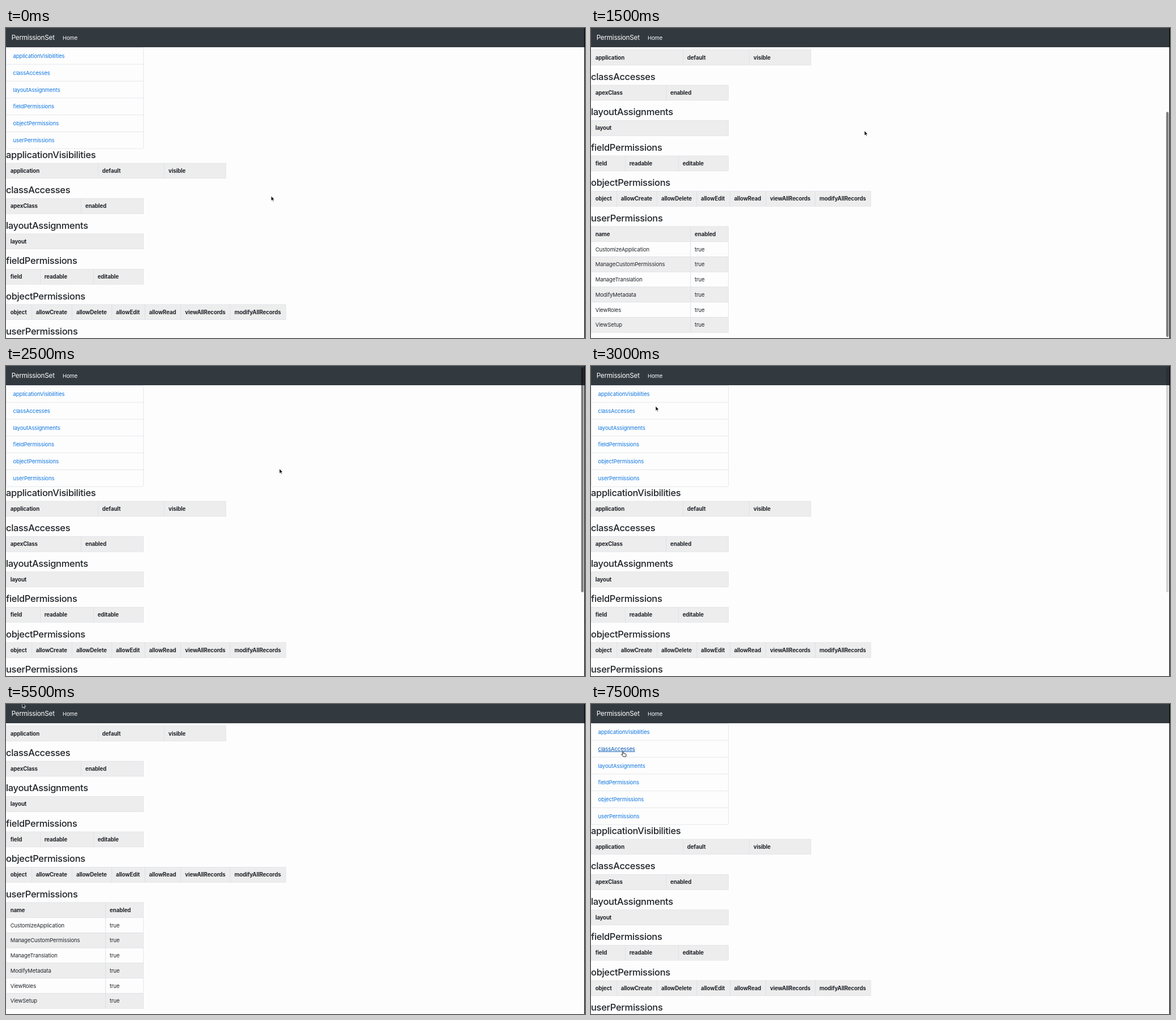
An HTML page for the animation above (8000 ms loop, 1022x548 px).

```html
<!DOCTYPE html>
<html lang="en">
<head>
<meta charset="utf-8">
<title>PermissionSet</title>
<style>
html, body { margin: 0; width: 100%; height: 100%; overflow: hidden; background: #fdfdfd; }
svg { display: block; width: 1022px; height: 548px; }
text { font: 9.5px Inter, Roboto, sans-serif; letter-spacing: -.012em; fill: #212529; }
.link { fill: #0f76e0; }
.link.hover { fill: #0056b3; text-decoration: underline; }
.title { font-size: 16.5px; font-weight: 500; letter-spacing: -.02em; }
.head { font-size: 9.7px; font-weight: 700; }
.nav { fill: #fff; }
.brand { font-size: 11.7px; letter-spacing: -.02em; }
.border { fill: none; stroke: #dddfe5; stroke-width: .7; }
</style>
</head>
<body>
<svg viewBox="0 0 1022 548">
  <g id="page"></g>
  <rect width="1022" height="34" fill="#32393f"/>
  <text class="nav brand" x="9.7" y="21.4">PermissionSet</text>
  <text class="nav" x="100" y="20.8">Home</text>
  <rect id="thumb" x="1015.2" width="4.4" height="398" rx="2.2"/>
  <rect x="1020.8" width="1.2" height="548"/>
  <path id="arrow" d="M0 0V8.6L2 6.8 3.3 9.8 4.7 9.2 3.4 6.3H6Z" stroke="#fff" stroke-width=".8"/>
  <path id="hand" d="M2.2 6V1.2a.9.9 0 0 1 1.8 0V4l3.6.6q1.2.3 1.1 1.6L8.2 9.6H3.6L.6 6.2q-.5-1 .4-1.2Z"
        fill="#fff" stroke="#111" stroke-width=".9"/>
</svg>
<script>
const $ = id => document.getElementById(id);
const page = $('page');

function add(tag, attrs, content = '') {
  const node = document.createElementNS('http://www.w3.org/2000/svg', tag);
  for (const name in attrs) node.setAttribute(name, attrs[name]);
  node.textContent = content;
  page.append(node);
  return node;
}

const ROW = 26.76, SECTION = 62.45, LINK_ROW = 29.8;

// Each section: title, column edges, header row, then data rows.
const sections = [
  ['applicationVisibilities', [0, 162, 279, 388.5], ['application', 'default', 'visible']],
  ['classAccesses', [0, 132.3, 243], ['apexClass', 'enabled']],
  ['layoutAssignments', [0, 243], ['layout']],
  ['fieldPermissions', [0, 60, 154, 243], ['field', 'readable', 'editable']],
  ['objectPermissions', [0, 45, 116.2, 186.4, 244.8, 308.3, 395.5, 494.3],
    ['object', 'allowCreate', 'allowDelete', 'allowEdit', 'allowRead', 'viewAllRecords', 'modifyAllRecords']],
  ['userPermissions', [0, 175.4, 243], ['name', 'enabled'],
    ...['CustomizeApplication', 'ManageCustomPermissions', 'ManageTranslation',
      'ModifyMetadata', 'ViewRoles', 'ViewSetup'].map(name => [name, 'true'])]
];

add('rect', { class: 'border', x: .4, y: 34.4, width: 242.2, height: 178.8, rx: 2 });
const links = sections.map(([title], i) => {
  const top = 34.4 + i * LINK_ROW;
  if (i) add('path', { class: 'border', d: `M0 ${top}H243` });
  return add('text', { class: 'link', x: 12.6, y: top + 18.5 }, title);
});

sections.forEach(([title, edges, ...rows], i) => {
  const top = 239 + i * SECTION;
  add('text', { class: 'title', x: 0, y: top - 9 }, title);
  rows.forEach((cells, r) => cells.forEach((label, c) => {
    const x = edges[c], y = top + r * ROW;
    add('rect', {
      class: 'border', x: x + .4, y, width: edges[c + 1] - x - (c === cells.length - 1 ? .8 : 0), height: ROW,
      style: `fill: ${r % 2 ? '#fdfdfd' : '#ededee'}`
    });
    add('text', { class: r ? 'cell' : 'head', x: x + 7.7, y: y + 17 }, label);
  }));
});

const STEP = 500, BOTTOM = 200.4;
// One state per step: scroll, scrollbar opacity, pointer x, pointer y, pointer shape.
const states = [
  [0, 0, 468, 297, 'arrow'],
  [0, 0, 478, 240, 'arrow'],
  [.6, 0, 482.6, 181.5, 'arrow'],
  [BOTTOM, .5, 482.6, 181.5, 'arrow'],
  [125.3, .5, 482.6, 181.5, 'arrow'],
  [0, .5, 482.6, 181.5, 'arrow'],
  [0, .16, 114, 70.8, 'arrow'],
  [BOTTOM, .5, 92.4, 54.2, 'hand'],
  [BOTTOM, .5, 92.4, 54.2, 'hand'],
  [BOTTOM, 0, 92.4, 54.2, 'hand'],
  [BOTTOM, 0, 64, 40, 'arrow'],
  [BOTTOM, 0, 28.8, -2, 'arrow'],
  [0, .5, 28.8, -2, 'arrow'],
  [0, 0, 28.8, -2, 'arrow'],
  [0, 0, 62, 58, 'arrow'],
  [0, 0, 53.4, 83.4, 'hand', 1]
];

function draw(now) {
  const [scroll, opacity, x, y, shape, hovered] = states[Math.floor(now / STEP) % states.length];
  page.setAttribute('transform', `translate(0 ${-scroll})`);
  $('thumb').setAttribute('y', 2 + scroll * .73);
  $('thumb').setAttribute('opacity', opacity);
  for (const name of ['arrow', 'hand']) {
    $(name).setAttribute('transform', `translate(${x} ${y})`);
    $(name).style.display = name === shape ? '' : 'none';
  }
  links.forEach((link, i) => link.classList.toggle('hover', i === hovered));
}

const start = performance.now();
function tick() {
  draw(performance.now() - start);
  requestAnimationFrame(tick);
}
tick();
</script>
</body>
</html>
```
